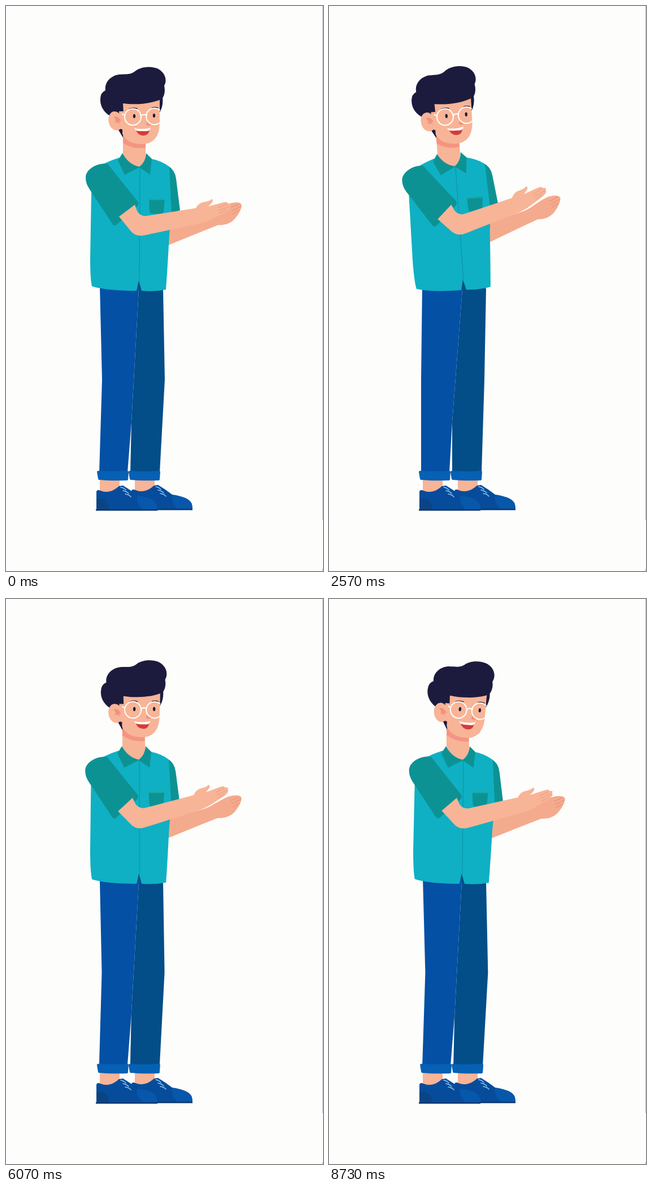
Animation, 561 px wide and 998 px high, one loop 8.76 s. Source, as an HTML page:

```html
<!DOCTYPE html>
<html lang="en">
<head>
<meta charset="utf-8">
<title>Clapping man</title>
<style>
  html, body { margin: 0; width: 100%; height: 100%; overflow: hidden; background: #fdfdfb; }
  svg { display: block; width: 100vw; height: 100vh; }
  .skin { fill: #f8b496; }
  .hair { fill: #1c1b3e; }
  .shirt { fill: #0fb0c3; }
  .trim { fill: #0d9294; }
  .cuff { fill: #0660b4; }
  .line { fill: none; stroke-linecap: round; }
</style>
</head>
<body>
<svg viewBox="0 0 561 998">
  <defs>
    <g id="shoe">
      <path fill="#064c9b" d="M160 858Q161 853 167 856Q184 863 200 848L207 847Q219 854 232 864Q264 869 267 881L268 890H160Z"/>
      <path fill="#0b4484" d="M160 870Q183 869 182 889H160Z"/>
      <path fill="#0757ab" d="M232 865Q230 880 242 889H268Q269 868 232 865Z"/>
      <path class="line" stroke="#8dc4ef" stroke-width="1.6" d="M203 850Q209 851 212 855M207 856Q213 857 217 861M211 862Q218 863 221 867"/>
      <path fill="#0b356f" d="M159 889H268V891.500H159Z"/>
    </g>
  </defs>

  <path fill="#b0b4c4" d="M560 0h1v908h-1zM560 994h1v4h-1z"/>

  <path class="skin" d="M166 834H201V854Q184 868 166 858ZM228 834H263V854Q246 868 228 858Z"/>
  <use href="#shoe" x="62" y="-1"/>
  <use href="#shoe"/>
  <path id="farLeg" fill="#034d88"/>
  <path id="nearLeg" fill="#0450a5"/>
  <path id="farCuff" class="cuff"/>
  <path id="nearCuff" class="cuff"/>

  <g id="torso">
    <g id="farArm">
      <path fill="#f4aa8d" d="M284 389L340 374Q358 370 369 362L385 353Q398 346 410 347Q418 348 417 354Q415 363 408 372Q397 388 375 387L335 403L286 423Z"/>
      <path class="line" stroke="#e68f78" d="M398 356L412 350M400 362L415 354M401 368L412 361"/>
    </g>
    <path class="trim" d="M286 282Q299 289 301 305L308 361L288 368Z"/>
    <path class="shirt" d="M200 268Q178 275 160 286L151 330L149 445Q149 482 152 495Q178 503 231 503L235 485L240 503Q262 505 283 501Q286 460 289 405L293 366L289 284Q275 273 252 269Z"/>
    <path class="line" stroke="#0b91a2" d="M237 286L236 486"/>
    <path class="trim" d="M253 341H281L279 362Q278 367 273 367H259Q254 367 254 361Z"/>
    <path class="line" stroke="#27a89c" stroke-width="1.500" d="M253 342H281"/>

    <path class="skin" d="M207 218V268Q217 282 236 284Q246 276 247 268V225Z"/>
    <path class="trim" d="M206 260L198 273L210 298L236 285L255 298L258 270L248 260Q247 276 236 284Q217 280 206 260Z"/>

    <g id="head">
      <path class="hair" d="M196 214L208 234L214 205L203 190ZM268 160H277Q279 176 272 188Z"/>
      <path fill="#f49482" d="M207 224V242Q226 254 247 250V238Z"/>
      <path class="skin" d="M206 168L272 161V206C272 230 261 244 241 244C224 244 213 239 206 226Z"/>
      <path class="hair" d="M186 195C174 189 166 177 167 164Q167 153 176 149C174 134 186 123 200 121C214 120 221 122 230 114C240 107 256 106 267 110C281 116 286 130 280 141Q283 155 276 164C257 173 229 175 207 172L208 190Z"/>
      <ellipse class="skin" cx="194" cy="203" rx="12.500" ry="17" transform="rotate(-12 194 203)"/>
      <path class="skin" d="M200 186H209V219L202 217Z"/>
      <path fill="#f3907f" d="M190 196Q199 193 204 204L200 203L202 209Q198 203 193 207Q196 200 190 196Z"/>
      <path class="line" stroke="#302438" stroke-width="1.500" d="M218 182Q224 179 232 181M258 180Q264 178 269 180"/>
      <ellipse class="hair" cx="227" cy="194.500" rx="2.200" ry="3.600"/>
      <ellipse class="hair" cx="262" cy="193.500" rx="2.200" ry="3.600"/>
      <path fill="#f3907f" d="M250 202L257 210Q253 212 248 210Z"/>
      <path fill="#d33c3a" d="M230 218Q242 221 254 218Q253 229 243 229Q232 228 230 218Z"/>
      <path fill="#fff" d="M227 216Q242 219 256 215Q255 221 248 221H237Q229 221 227 216Z"/>
      <g class="line" stroke="#fff" stroke-width="2">
        <circle cx="224.500" cy="196" r="14.500"/>
        <path d="M272 184A14.500 14.500 0 1 0 272 206M239 194Q243 190 249 193M210 193L206 191"/>
      </g>
    </g>

    <path class="trim" d="M180 279C164 276 141 287 141 303C141 315 147 322 152 330L189 386Q193 390 198 384L233 353Q236 349 233 345L208 314Z"/>
    <g id="nearArm">
      <path class="skin" d="M200 372L228 351L232 362Q237 371 247 371L336 357Q341 347 352 346Q360 345 364 341Q368 343 364 348L358 354L384 347Q393 345 392 349Q400 348 397 353Q400 358 389 364L366 376Q352 383 335 386L245 405Q231 408 222 399Z"/>
      <path class="line" stroke="#e99c82" d="M375 356L391 350M377 361L396 354M378 366L390 360"/>
    </g>
  </g>
</svg>
<script>
const LOOP = 8760;
const SWAY = 4500;
const CLAP = SWAY / 13;
const HOLD = [8070, 8170];

const byId = id => document.getElementById(id);
const shape = (id, d) => byId(id).setAttribute('d', d);
const turn = (id, angle, x, y) =>
  byId(id).setAttribute('transform', `rotate(${angle} ${x} ${y})`);

function ease(time, start, length) {
  const x = Math.min(1, Math.max(0, (time - start) / length));
  return x * x * (3 - 2 * x);
}
const bump = (time, peak, width) => Math.exp(-(((time - peak) / width) ** 2));

function drawLegs(lean) {
  const knee = -6 * lean, foot = -2 * lean, crotch = 235 + lean;
  const split = 222 - 4 * lean;
  shape('farLeg', `M228 480H246L278 499L${281 + knee} 660L${272 + foot} 824
    H${220 + foot}L${split} 735L${crotch} 500Z`);
  shape('nearLeg', `M${166 - lean} 494H${crotch}V500L${split} 735L${215 + foot} 824
    H${165 + foot}L${170 + knee - lean} 660Z`);
  const cuff = (id, x, width) => shape(id, `M${x + foot} 823q0 -2 3 -2q${width / 2} 2 ${width - 6} 0
    q3 0 3 2l-1 13q0 2 -3 2q${-width / 2} 1 ${8 - width} -1q-2 0 -2 -2z`);
  cuff('farCuff', 217, 56);
  cuff('nearCuff', 161, 56);
}

function draw(time) {
  if (time > HOLD[0] && time < HOLD[1]) time = HOLD[0];
  const u = time % SWAY;
  const toRight = bump(u, 4230, 110), toLeft = bump(u, 1740, 90);
  const lean = ease(u, 1520, 330) - ease(u, 3900, 300) - 0.06 * toRight + 0.1 * toLeft;
  const open = 1 - Math.abs(Math.cos(Math.PI * time / CLAP)) ** 3;

  drawLegs(lean);
  turn('torso', -4.3 * lean, 217, 460);
  turn('head', 2 * open + 3.5 * toRight - 2 * toLeft - lean, 228, 240);
  turn('nearArm', -5.4 * open - 0.8 * toRight, 230, 388);
  turn('farArm', 0.4 * open + 0.6 * lean, 289, 405);
}

function frame(now) {
  draw(now % LOOP);
  requestAnimationFrame(frame);
}
draw(0);
requestAnimationFrame(frame);
</script>
</body>
</html>
```
